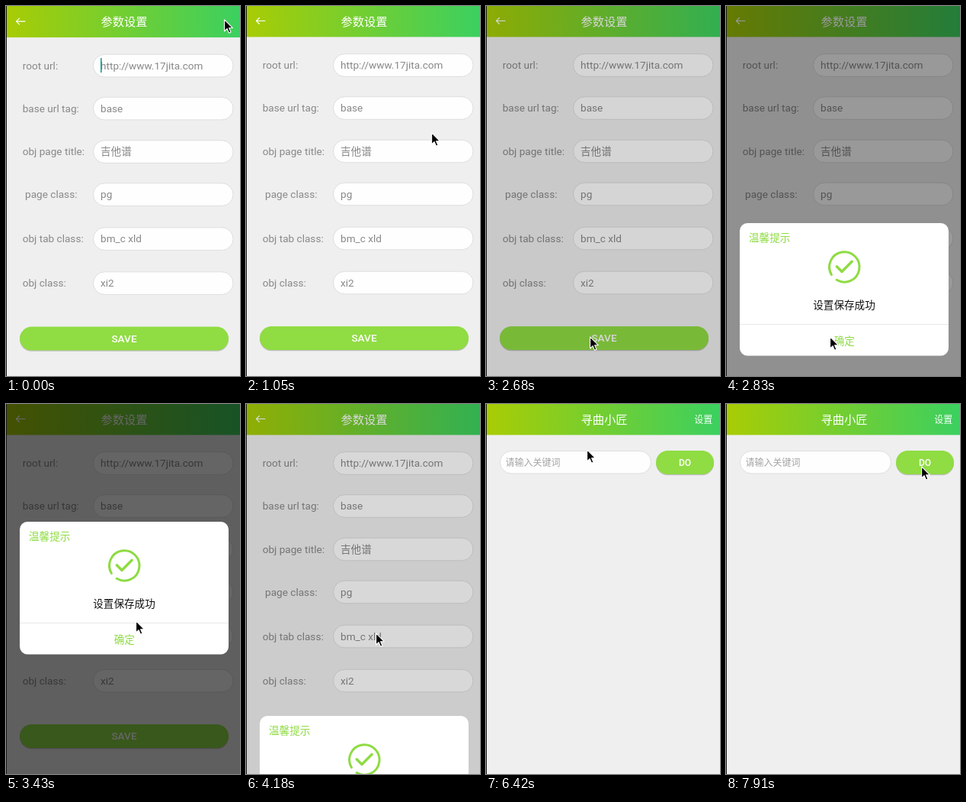
An HTML page for the animation above (8 s loop, 307 by 484 pixels).

```html
<!DOCTYPE html>
<html lang="zh">
<head>
<meta charset="utf-8">
<title>参数设置</title>
<style>
  html, body { margin: 0; width: 100%; height: 100%; overflow: hidden; background: #efefef; }
  svg { display: block; width: 307px; height: 484px; }
  text { font-family: Roboto, "Noto Sans CJK SC", "Noto Sans CJK", sans-serif; font-size: 13.6px; white-space: pre; }
  .mid { text-anchor: middle; }
  .grey { fill: #888; }
  .white { fill: #fff; }
  .lime { fill: #8edb43; }
  .title { font-size: 15.3px; }
  .small { font-size: 12px; }
  .strong { font-weight: 500; }
  .field { fill: #fefefe; stroke: #dedede; stroke-width: 1; }
  .line { fill: none; stroke-linecap: round; stroke-linejoin: round; }
</style>
</head>
<body>
<svg viewBox="0 0 307 484">
  <defs>
    <linearGradient id="bar">
      <stop offset="0" stop-color="#a9cc04"/>
      <stop offset="1" stop-color="#3bd060"/>
    </linearGradient>
  </defs>

  <g id="home">
    <rect width="307" height="484" fill="#efefef"/>
    <rect width="307" height="40.5" fill="url(#bar)"/>
    <text class="white title mid" x="155" y="25.5">寻曲小匠</text>
    <text class="white small" x="273.3" y="24.5">设置</text>
    <rect class="field" x="18.5" y="61.5" width="198" height="29.5" rx="14.7"/>
    <text class="small" x="25.5" y="81" fill="#a3a3a3">请输入关键词</text>
    <rect id="homeCaret" x="25" y="67" width="1.5" height="19" fill="#1f9c8c"/>
    <g id="doBtn"></g>
  </g>

  <g id="settings">
    <rect width="307" height="484" fill="#efefef"/>
    <rect y="-2" width="307" height="42.5" fill="url(#bar)"/>
    <path class="line" d="M25 19.5H13.5M17.5 15.5L13.5 19.5L17.5 23.5" stroke="#fff" stroke-width="1.1"/>
    <text class="white title mid" x="155" y="25.5">参数设置</text>
    <g id="rows"></g>
    <rect id="caret" x="124" y="67.5" width="1.6" height="19" fill="#1f9c8c"/>
    <g id="saveBtn"></g>
  </g>

  <rect id="dim" width="307" height="484"/>

  <g id="dialog">
    <rect x="18" y="154" width="274" height="173.5" rx="10" fill="#fff"/>
    <text class="lime" x="30" y="178">温馨提示</text>
    <path class="line" d="M138.4 221.5A19.7 19.7 0 1 1 145.2 228.3" stroke="#8edb43" stroke-width="3"/>
    <path class="line" d="M145.3 210.7L152 217.5L165.2 204.3" stroke="#8edb43" stroke-width="3.4"/>
    <text class="mid" x="155" y="266" fill="#111">设置保存成功</text>
    <rect x="18" y="286" width="274" height="1" fill="#e9e9e9"/>
    <path id="okPress" d="M18 287H292V317.5A10 10 0 0 1 282 327.5H28A10 10 0 0 1 18 317.5Z" fill="#f1f1f1"/>
    <text class="lime mid" x="155.3" y="313">确定</text>
  </g>

  <rect width="1" height="484" fill="#181818"/>

  <path id="pointer" d="M0.6 0.8V16L4.1 12.7L6.5 18.3L9 17.2L6.6 11.7H11.3Z"
        fill="#000" stroke="#fff" stroke-width="1.1" stroke-linejoin="round"/>
</svg>

<script>
const LOOP = 8000;
const $ = id => document.getElementById(id);

const fields = [
  [77.5, 'root url:', 'http://www.17jita.com'],
  [133.5, 'base url tag:', 'base'],
  [190, 'obj page title:', '吉他谱'],
  [246, ' page class:', 'pg'],
  [304, 'obj tab class:', 'bm_c xld'],
  [362, 'obj class:', 'xi2']
];
$('rows').innerHTML = fields.map(([y, label, value]) => `
  <text class="grey" x="21.7" y="${y + 4.9}">${label}</text>
  <rect class="field" x="114.5" y="${y - 14.8}" width="183.5" height="29.6" rx="14.8"/>
  <text class="grey" x="124" y="${y + 4.9}">${value}</text>`).join('');

function button(id, x, y, w, label, size) {
  $(id).innerHTML = `
    <rect x="${x}" y="${y + 1.2}" width="${w}" height="31" rx="15.5" fill="#000" opacity=".2"/>
    <rect x="${x}" y="${y}" width="${w}" height="31" rx="15.5" fill="#90dc43"/>
    <rect class="press" x="${x}" y="${y}" width="${w}" height="31" rx="15.5" fill="#000"/>
    <text class="white strong mid" x="${x + w / 2}" y="${y + 15.5 + size * 0.36}" style="font-size:${size}px">${label}</text>`;
}
button('saveBtn', 18, 419, 274, 'SAVE', 13.6);
button('doBtn', 223, 61, 76, 'DO', 12);

// Each track is a list of [start time, value...], held until the next entry.
const tracks = {
  pointer: [
    [0, 286, 17], [900, 277, 56], [1050, 243, 165], [1200, 194, 297], [1350, 157, 388],
    [1500, 140, 426], [1650, 136, 432], [3280, 150, 372], [3430, 170, 283], [3580, 170, 294],
    [3730, 170, 299], [4330, 149, 285], [4480, 112, 210], [4630, 70, 125], [4780, 30, 52],
    [4930, 3, 20], [5080, 12, 15], [5230, 19, 16], [5980, 32, 23], [6130, 76, 42],
    [6280, 132, 59], [6430, 190, 72], [6580, 235, 81], [6730, 252, 82], [6880, 256, 81]
  ],
  // settings page: vertical offset, visibility
  page: [[0, 0.6, 1], [150, 0.2, 1], [300, 0, 1], [5530, 1, 1], [5680, 0, 0]],
  caret: [[0, 1], [750, 0], [1350, 1], [1800, 0], [2250, 1], [2680, 0], [4330, 1], [4780, 0], [5230, 1]],
  homeCaret: [[0, 1], [6130, 0], [6580, 1], [7010, 0], [7460, 1], [7910, 0]],
  // dim level, dialog offset
  modal: [
    [0, 0, 400], [2680, 0.16, 400], [2830, 0.4, 130], [2980, 0.55, 22], [3130, 0.6, 0],
    [4030, 0.45, 70], [4180, 0.15, 254], [4330, 0, 400]
  ],
  okPress: [[0, 0], [3880, 1], [4030, 0]],
  savePress: [[0, 0], [2400, 0.05], [2550, 0.08], [2680, 0]],
  doPress: [[0, 0], [7610, 0.05], [7760, 0.08], [7910, 0]]
};

function at(name, t) {
  const [, ...values] = tracks[name].findLast(step => step[0] <= t);
  return values;
}
const shift = (id, x, y) => $(id).setAttribute('transform', `translate(${x} ${y})`);
const fade = (el, v) => el.setAttribute('opacity', v);
const savePress = document.querySelector('#saveBtn .press');
const doPress = document.querySelector('#doBtn .press');

function draw(t) {
  const [pageY, pageOn] = at('page', t);
  const [dim, dialogY] = at('modal', t);
  shift('pointer', ...at('pointer', t));
  shift('settings', 0, pageY);
  shift('dialog', 0, dialogY);
  fade($('settings'), pageOn);
  fade($('dim'), dim);
  for (const id of ['caret', 'homeCaret', 'okPress']) fade($(id), at(id, t)[0]);
  fade(savePress, at('savePress', t)[0]);
  fade(doPress, at('doPress', t)[0]);
}

const start = performance.now();
function tick() {
  draw((performance.now() - start) % LOOP);
  requestAnimationFrame(tick);
}
tick();
</script>
</body>
</html>
```
